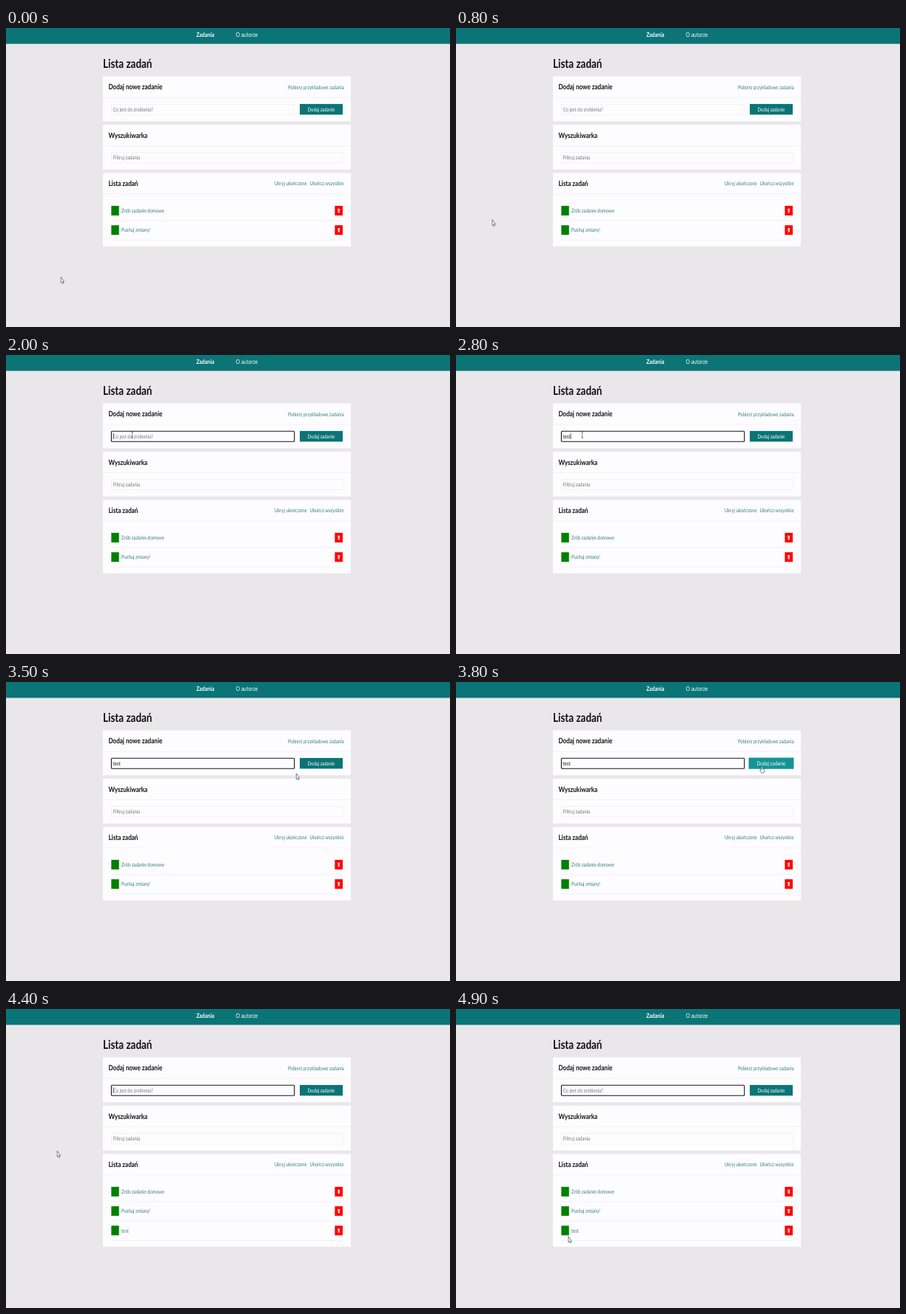
An HTML page that plays this animation: 600x405 px, repeating every 5 s.

```html
<!DOCTYPE html>
<html lang="pl">
<head>
<meta charset="utf-8">
<title>Lista zadań</title>
<style>
  html, body { margin: 0; width: 100%; height: 100%; overflow: hidden; background: #e9e7ea; }
  svg { display: block; width: 100%; height: 100%; }
  text { font-family: Lato, sans-serif; font-size: 7.35px; fill: #111; text-rendering: geometricPrecision; }
  .nav { font-size: 8.5px; fill: #fff; }
  .h1 { font-size: 16.6px; font-weight: 700; }
  .h2 { font-size: 10px; font-weight: 700; }
  .bold { font-weight: 700; }
  .link { fill: #357f80; }
  .hint { fill: #757575; }
  .white { fill: #fff; }
  .pointer { fill: #fff; stroke: #333; stroke-width: .6px; stroke-linejoin: round; }
</style>
</head>
<body>
<svg id="stage" viewBox="0 0 600 405"></svg>
<script>
const LOOP = 5000, STEP = 100, BLINK = 530;
const SQUEEZE = 0.81;
const LEFT = 131, WIDTH = 335, INNER = 142.3, RIGHT = 456.6;
const PANEL_TOP = 65.5, PANEL_PITCH = 65.45, PANEL_HEIGHT = 60.7, ROW = 26.3;
const TEAL = [11, 116, 118], TEAL_HOVER = [21, 148, 149];
const PAPER = '#fdfcfe', LINE = '#eeedf0';
const stage = document.getElementById('stage');

function add(parent, tag, attrs, content) {
  const el = document.createElementNS('http://www.w3.org/2000/svg', tag);
  for (const key in attrs) el.setAttribute(key, attrs[key]);
  if (content) el.textContent = content;
  parent.append(el);
  return el;
}
const rect = (parent, x, y, width, height, fill, more) =>
  add(parent, 'rect', { x, y, width, height, fill, ...more });
const label = (parent, x, y, text, cls = '', anchor = 'start') =>
  add(parent, 'text', {
    transform: `translate(${x} ${y}) scale(${SQUEEZE} 1)`, class: cls, 'text-anchor': anchor
  }, text);
const show = (el, on) => el.setAttribute('visibility', on ? 'visible' : 'hidden');
const mix = (a, b, k) => a + (b - a) * k;
const ramp = (t, from, to) => Math.min(1, Math.max(0, (t - from) / (to - from)));
const ease = k => k * k * (3 - 2 * k);
const rgb = c => `rgb(${c.map(Math.round).join()})`;

const panelTop = index => PANEL_TOP + index * PANEL_PITCH;

function panel(index, title, height = PANEL_HEIGHT) {
  const y = panelTop(index);
  const box = rect(stage, LEFT, y, WIDTH, height, PAPER);
  rect(stage, LEFT, y + 28.2, WIDTH, 0.7, LINE);
  label(stage, 138.4, y + 17.7, title, 'h2');
  return box;
}
const link = (index, right, text) =>
  label(stage, right, panelTop(index) + 17, text, 'link', 'end');

function field(index, width, text) {
  const y = panelTop(index);
  rect(stage, INNER, y + 37.8, width, 14.2, PAPER, { stroke: LINE, 'stroke-width': 0.7 });
  return label(stage, 144.7, y + 47.4, text, 'hint');
}

function task(index, text) {
  const g = add(stage, 'g', { transform: `translate(0 ${index * ROW})` });
  rect(g, INNER, 240.9, 10.4, 13, '#008000');
  label(g, 156, 249.9, text, 'link');
  rect(g, 444.4, 240.9, 10.6, 13, '#ff0000');
  add(g, 'path', { d: 'M448 244.8h3.4v.9h-.4l-.2 4.6h-2.2l-.2-4.6H448z', fill: '#ffc4c4' });
  rect(g, INNER, 260.5, 312.7, 0.7, LINE);
  return g;
}

// Page
rect(stage, 0, 0, 600, 21.5, rgb(TEAL));
label(stage, 257.2, 11.7, 'Zadania', 'nav bold');
label(stage, 310.4, 11.7, 'O autorze', 'nav');
label(stage, LEFT, 53.8, 'Lista zadań', 'h1');

panel(0, 'Dodaj nowe zadanie');
link(0, RIGHT, 'Pobierz przykładowe zadania');
const hint = field(0, 247.4, 'Co jest do zrobienia?');
const typed = label(stage, 144.7, 112.9, '');
const caret = rect(stage, 0, 105.8, 0.6, 8.2, '#111');
const focusRing = rect(stage, 142.4, 103.2, 247.3, 14, 'none',
  { stroke: '#1a1a1a', 'stroke-width': 1.1, rx: 1 });
const button = add(stage, 'g', {});
const buttonBox = rect(button, -29, -7.3, 58, 14.5, rgb(TEAL));
label(button, 0, 2.6, 'Dodaj zadanie', 'white', 'middle');

panel(1, 'Wyszukiwarka');
field(1, 312.7, 'Filtruj zadania');

const listBox = panel(2, 'Lista zadań');
link(2, 406.6, 'Ukryj ukończone');
link(2, RIGHT, 'Ukończ wszystkie');
task(0, 'Zrób zadanie domowe');
task(1, 'Pushuj zmiany!');
const newTask = task(2, 'test');

// Pointers, hot spot at 0,0
const pointer = add(stage, 'g', { class: 'pointer' });
const [arrow, beam, hand] = [
  'M.3 .3V8.2L1.7 6.8 2.7 9.3 3.8 8.7 2.9 6.4H4.6Z',
  'M-1.5-4H1.5M0-4V4M-1.5 4H1.5',
  'M-.7 5.2V.6Q0-.4.7.6V3.4L3.2 4.1V7L2.5 9H-.8L-2.6 6.2V4.8Z'
].map(d => add(pointer, 'path', { d }));

// Each sweep ends at (x, y); bend bows it sideways
const start = { x: 74, y: 337 };
const sweeps = [
  { from: 0, to: 600, x: 39, y: 271.5, bend: -56 },
  { from: 700, to: 1300, x: 170.7, y: 108, bend: 0 },
  { from: 2900, to: 3500, x: 392, y: 123.5, bend: 0 },
  { from: 3500, to: 3700, x: 413.5, y: 114, bend: 0 },
  { from: 4100, to: 4400, x: 69, y: 192, bend: 0 },
  { from: 4400, to: 4700, x: 70, y: 277, bend: -16 },
  { from: 4700, to: 4900, x: 151.6, y: 307.8, bend: 0 }
];
const pointerAt = t => sweeps.reduce((p, s) => {
  const k = ease(ramp(t, s.from, s.to));
  return { x: mix(p.x, s.x, k) + s.bend * 4 * k * (1 - k), y: mix(p.y, s.y, k) };
}, start);
const inside = (p, x0, y0, x1, y1) => p.x >= x0 && p.x <= x1 && p.y >= y0 && p.y <= y1;

// Focus, keystrokes and submit; each restarts the caret's blink
const edits = [
  { at: 1500, text: '' },
  { at: 2400, text: 'te' },
  { at: 2500, text: 'tes' },
  { at: 2800, text: 'test' },
  { at: 3900, text: '' }
];

function draw(now) {
  const t = Math.floor(now % LOOP / STEP) * STEP;

  const edit = edits.findLast(e => t >= e.at);
  const text = edit ? edit.text : '';
  typed.textContent = text;
  show(hint, !text);
  show(focusRing, edit);
  show(caret, edit && (t - edit.at) % (2 * BLINK) < BLINK);
  caret.setAttribute('x', 144.8 + (text && typed.getComputedTextLength() * SQUEEZE));

  const added = t >= 3900;
  show(newTask, added);
  listBox.setAttribute('height', PANEL_HEIGHT + ROW * (added ? 2.47 : 1.47));

  const hover = ramp(t, 3600, 3800) - ramp(t, 4100, 4300);
  button.setAttribute('transform', `translate(426 110.2) scale(${1 + 0.05 * hover})`);
  buttonBox.setAttribute('fill', rgb(TEAL.map((c, i) => mix(c, TEAL_HOVER[i], hover))));

  const p = pointerAt(t);
  const overField = inside(p, 142, 103, 390, 118) || inside(p, 142, 168, 455, 183);
  const overButton = inside(p, 397, 103, 455, 118);
  pointer.setAttribute('transform', `translate(${p.x} ${p.y})`);
  show(beam, overField);
  show(hand, overButton);
  show(arrow, !overField && !overButton);
}

let begin;
function tick(now) {
  begin ??= now;
  draw(now - begin);
  requestAnimationFrame(tick);
}
draw(0);
requestAnimationFrame(tick);
</script>
</body>
</html>
```
